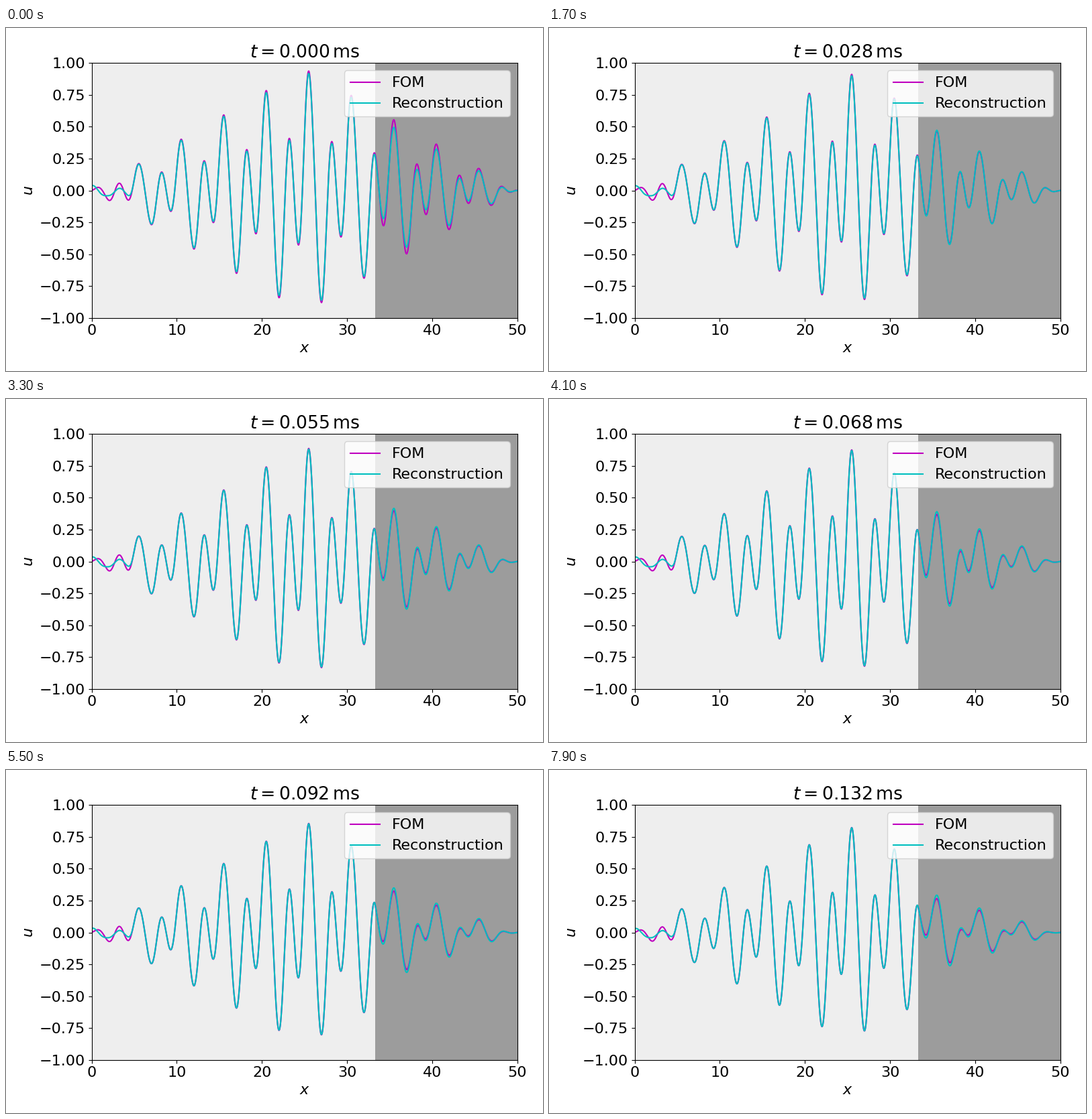
A matplotlib script that plays this animation: 800x512 px, repeating every 8 s.

```python
import numpy as np
import matplotlib.pyplot as plt
from matplotlib.animation import FuncAnimation

plt.rcParams.update({"font.family": "DejaVu Sans", "font.size": 16})

W, H, DPI = 800, 512, 100
FRAMES, INTERVAL = 80, 100
DT = 1 / 600
LENGTH, SPLIT = 50, 100 / 3
D_LEFT, D_RIGHT = 0.208, 1.32

x = np.linspace(0, LENGTH, 1001)
dx = x[1] - x[0]


def sigmoid(z):
    return (1 + np.tanh(z / 2)) / 2


def initial():
    """Periodic wave train under a triangular envelope."""
    phi = 2 * np.pi * (x - 1.25) / 5
    amps = (0.395, 0.672, -0.045, -0.02)
    wave = -sum(a * np.sin(k * phi) for k, a in enumerate(amps, 1))
    return wave * (1 - np.abs(x - 25) / 25)


def diffuse(u, count):
    """Crank-Nicolson for u_t = D(x) u_xx with u = 0 at both ends."""
    n = len(u)
    lap = np.eye(n, k=1) - 2 * np.eye(n) + np.eye(n, k=-1)
    lap *= (np.where(x < SPLIT, D_LEFT, D_RIGHT) / dx**2)[:, None]
    lap[[0, -1]] = 0
    half = DT / 2 * lap
    step = np.linalg.solve(np.eye(n) - half, np.eye(n) + half)
    out = [u]
    for _ in range(count - 1):
        out.append(step @ out[-1])
    return np.array(out)


full = diffuse(initial(), FRAMES + 20)


def state(t):
    """Full solution at any time, linear between steps."""
    i, f = divmod(t / DT, 1)
    i = int(i)
    return (1 - f) * full[i] + f * full[i + 1]


right_side = sigmoid((x - SPLIT) / 0.1)
ripple = 0.038 * np.cos(2 * np.pi * x / 2.15) * sigmoid((4.7 - x) / 0.2)


def reconstruct(t):
    """Starts too smooth, then decays slower than the full solution on the right."""
    left = state(t + 0.02 * np.exp(-t / 0.05))
    right = state(0.85 * t + 0.018 * np.exp(-t / 0.012))
    return left + right_side * (right - left) + ripple * np.exp(-2 * t)


fig, ax = plt.subplots(figsize=(W / DPI, H / DPI), dpi=DPI, facecolor="white")
ax.axvspan(0, SPLIT, color="#eeeeee", lw=0)
ax.axvspan(SPLIT, LENGTH, color="#9c9c9c", lw=0)
fom, = ax.plot(x, full[0], "m", label="FOM")
rec, = ax.plot(x, full[0], "c", label="Reconstruction")
ax.set(xlim=(0, LENGTH), ylim=(-1, 1), xlabel="$x$", ylabel="$u$")
ax.legend(loc="upper right")
title = ax.set_title("")


def draw(i):
    t = i * DT
    fom.set_ydata(full[i])
    rec.set_ydata(reconstruct(t))
    title.set_text(rf"$t = {t:.3f}\,$ms")
    return fom, rec, title


draw(0)
fig.tight_layout()

anim = FuncAnimation(fig, draw, frames=FRAMES, interval=INTERVAL,
                     init_func=lambda: draw(0), repeat=True, repeat_delay=0)
plt.show()
```
